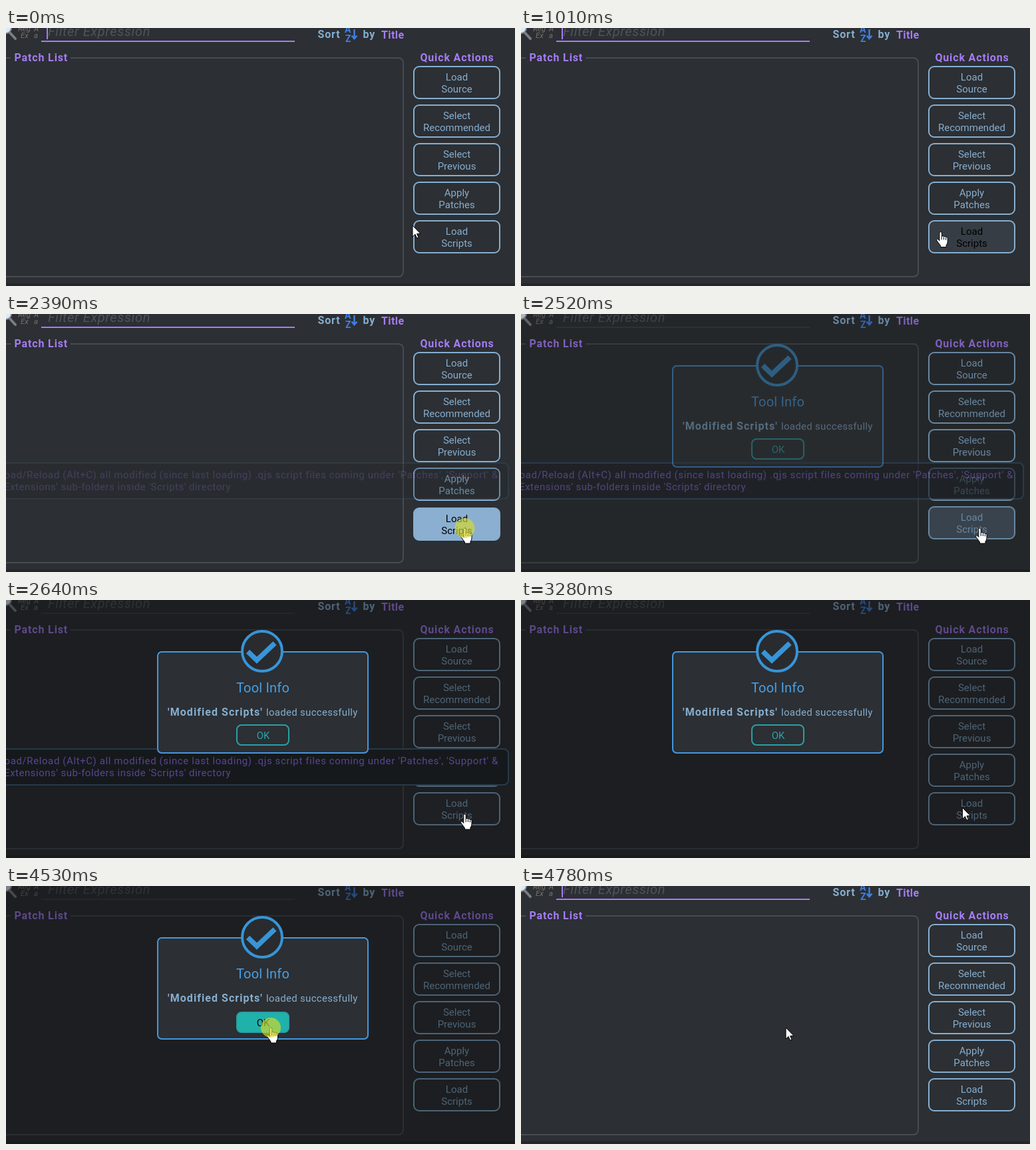
An HTML page that plays this animation: 765x388 px, repeating every 5.04 s.

```html
<!DOCTYPE html>
<html lang="en">
<head>
<meta charset="utf-8">
<title>Load scripts</title>
<style>
  html, body { margin: 0; width: 100%; height: 100%; overflow: hidden; background: #2c2f33; }
  svg { display: block; width: 765px; height: 388px; }
  text { font: 15px Roboto, sans-serif; fill: #86aed0; white-space: pre; }
  .bold { font-weight: 700; font-size: 16px; letter-spacing: .85px; }
  .purple { fill: #a57cf5; }
  .mid { text-anchor: middle; }
  .end { text-anchor: end; }
  .italic { font-style: italic; }
  .hint { font-size: 20px; letter-spacing: .65px; fill: #505358; }
  .flag { font-size: 11.5px; fill: #77726d; }
  .sort { font-size: 14px; font-weight: 700; fill: #3f7fe0; }
  .button rect { fill: #8bafd0; fill-opacity: 0; stroke: #86aed0; stroke-width: 2; }
  #ok rect { fill: #20b2aa; stroke: #28a0a6; }
  #ok text { fill: #2aa4a9; }
  .button.hover text, #ok.hover text { fill: #000; }
  #tip text { fill: #8d6ae0; }
  .cursor { fill: #fff; stroke: #000; stroke-linejoin: round; }
</style>
</head>
<body>
<svg viewBox="0 0 765 388">
  <rect width="765" height="388" fill="#2c2f33"/>
  <rect y="384" width="765" height="4" fill="#25272a"/>

  <g id="main">
    <path d="M4 5L14 16" stroke="#7b7d80" stroke-width="4" stroke-linecap="round"/>
    <circle r="8" fill="#dbe9f8" stroke="#85888c" stroke-width="2"/>
    <text class="flag italic" x="18" y="5">Reg</text>
    <text class="flag italic" x="22" y="15">Ex</text>
    <text class="flag italic" x="42" y="5">A</text>
    <text class="flag italic" x="42" y="15">a</text>

    <text class="hint italic" x="63" y="12">Filter Expression</text>
    <path d="M53 20H434" stroke="#4a4d52"/>
    <path id="focus" d="M53 20H434" stroke="#a57cf5" stroke-width="2"/>
    <rect id="caret" x="61" width="2" height="17" fill="#a57cf5"/>

    <text class="bold" x="468.5" y="15">Sort</text>
    <text class="sort" x="509" y="7">A</text>
    <text class="sort" x="510" y="21">Z</text>
    <path d="M523.5 2V15M519.5 11.5L523.5 16L527.5 11.5" fill="none" stroke="#3f7fe0" stroke-width="2.5"/>
    <text class="bold" x="536.5" y="15">by</text>
    <text class="bold purple" x="564" y="16" style="letter-spacing:.4px">Title</text>

    <path d="M0 45H7M97 45H589Q597 45 597 53V366Q597 374 589 374H0" fill="none" stroke="#484b50" stroke-width="2"/>
    <text class="bold purple" x="12.5" y="50">Patch List</text>
    <text class="bold purple mid" x="678" y="50">Quick Actions</text>
    <g id="actions"></g>
  </g>

  <g id="tip">
    <rect x="-14" y="224" width="769" height="54" rx="7" fill="#20272b" stroke="#3c5a72" stroke-width="2"/>
    <text class="end" x="740" y="247" style="letter-spacing:.61px">Load/Reload (Alt+C) all modified (since last loading) .qjs script files coming under 'Patches', 'Support' &amp;</text>
    <text class="end" x="338" y="265" style="letter-spacing:.5px">'Extensions' sub-folders inside 'Scripts' directory</text>
  </g>

  <rect id="shade" width="765" height="388"/>

  <g id="modal">
    <rect x="228" y="78" width="316" height="152" rx="6" fill="#2c2f33" stroke="#4398e0" stroke-width="2"/>
    <circle cx="385" cy="77" r="30" fill="#292b2f" stroke="#3795d8" stroke-width="4"/>
    <path d="M363.5 77.5L377 90.5L404 65" fill="none" stroke="#3795d8" stroke-width="7.5"/>
    <text class="mid" x="386" y="139" style="font-size:20px;letter-spacing:.2px;fill:#47a0e8">Tool Info</text>
    <text class="bold" x="243" y="174" style="letter-spacing:1.05px">'Modified Scripts'</text>
    <text x="391" y="174" style="letter-spacing:.3px">loaded successfully</text>
    <g id="ok" class="button">
      <rect x="347" y="188" width="78" height="30" rx="7"/>
      <text class="mid" x="386.5" y="209">OK</text>
    </g>
  </g>

  <g id="pointer">
    <path id="arrow" class="cursor" d="M0 0V17L4 13.3L6.5 19L9 18L6.6 12.4H12Z"/>
    <g id="hand" class="cursor">
      <path d="M-1.7 1.7a1.7 1.7 0 0 1 3.4 0V7.5a1.6 1.6 0 0 1 3.2 .6a1.5 1.5 0 0 1 3 .8a1.4 1.4 0 0 1 2.6 1V15q0 3-2 5v3H0v-2L-5.5 13.5q-1.2-2 .5-2.6q1.3-.3 3.3 2.6z"/>
      <path d="M1.7 7.5v4.5M4.9 8.5v3.5M7.9 9.3v3" fill="none"/>
    </g>
    <circle id="click" r="15" fill="#d8dc28"/>
  </g>
</svg>
<script>
// The picture advances in 40 equal ticks per loop.
const TICK = 126, TICKS = 40, LEAD = 10;
const $ = id => document.getElementById(id);

$('actions').innerHTML = ['Load Source', 'Select Recommended', 'Select Previous', 'Apply Patches', 'Load Scripts']
  .map((label, i) => {
    const [a, b] = label.split(' '), y = 58 + 58 * i;
    return `<g class="button"><rect x="613" y="${y}" width="129" height="48" rx="8"/>
      <text class="mid" x="677.5" y="${y + 21}">${a}</text>
      <text class="mid" x="677.5" y="${y + 39}">${b}</text></g>`;
  }).join('');
const load = $('actions').lastElementChild;

const mix = (a, b, k) => a + (b - a) * k;
const show = (id, v) => $(id).setAttribute('opacity', Number(v));

function setButton(button, fill, hover, pressed) {
  button.classList.toggle('hover', hover);
  button.firstElementChild.style.fillOpacity = fill;
  button.setAttribute('transform', `translate(0 ${pressed ? 2 : 0})`);
}

function draw(now) {
  const n = Math.floor((now + LEAD) / TICK) % TICKS;
  const ramp = (from, to) => Math.min(1, Math.max(0, (n - from) / (to - from)));
  const during = (from, to) => n >= from && n < to;

  const closing = 1 - ramp(36, 38);
  const modal = ramp(19, 21) * closing;
  const overLoad = during(8, 20), overOk = during(30, 37);
  const pressLoad = during(18, 20), pressOk = during(36, 37);

  // The caret blinks from the moment the field regains focus.
  const blink = Math.floor(((n + 2) % TICKS + .5) / 4.25) % 2 === 0;
  show('caret', blink && !modal);
  show('focus', !modal);

  show('main', 1 - .15 * modal);
  show('shade', .36 * modal);
  show('modal', modal);
  show('tip', ramp(18, 21) ** 1.25 * (1 - ramp(21, 24)));

  setButton(load, ramp(7, 10) ** 2 * (1 - ramp(19, 22)) ** 3, overLoad, pressLoad);
  setButton($('ok'), ramp(29, 32) * closing, overOk, pressOk);

  const first = ramp(6, 10), second = ramp(25, 30) ** 1.5;
  const x = mix(mix(611, 689.5, first ** 2), 398, second);
  const y = mix(mix(297, 322, first ** 1.4), 213, second);
  $('pointer').setAttribute('transform', `translate(${x} ${y})`);
  const hand = during(8, 26) || overOk;
  show('arrow', !hand);
  show('hand', hand);
  show('click', .65 * (pressLoad || pressOk));
  requestAnimationFrame(draw);
}
requestAnimationFrame(draw);
</script>
</body>
</html>
```
